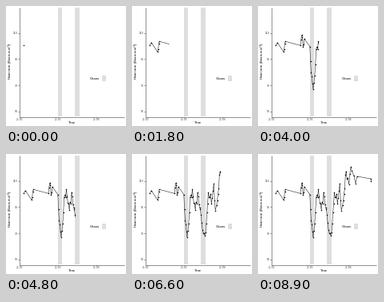
A matplotlib script that plays this animation: 150x150 px, repeating every 10 s.

```python
import numpy as np
import matplotlib.pyplot as plt
from matplotlib.animation import FuncAnimation
from matplotlib.patches import Rectangle

SIZE, DPI = 150, 100
PX = 72 / DPI  # points per pixel
FRAMES, STEP_MS, LAST_STEP = 100, 100, 89

plt.rcParams.update({
    "font.family": "Liberation Sans",
    "mathtext.fontset": "custom",
    "mathtext.rm": "Liberation Sans",
})

# Bursts of evenly spaced readings: first x, last x, heights (stage pixels)
BURSTS = [
    (22.3, 24.2, [49, 45.7]),
    (31.9, 34.3, [57.3, 54, 46.5, 44.3]),
    (53, 57.9, [49.3, 42, 36.3, 38.5, 51, 48, 41]),
    (64.8, 68.9, [50.5, 69, 83, 87.5, 97, 104]),
    (69.9, 81, [96, 87, 73, 54, 51, 54, 44, 53, 61, 62, 70, 60, 62]),
    (82, 87.1, [48, 53, 63, 67, 69, 76, 86]),
    (88.2, 91.2, [95, 99, 99, 102]),
    (92, 95.4, [98, 87, 73, 62, 48]),
    (96.3, 104.2, [54, 54, 50, 62, 55, 46, 37, 58, 70.5]),
    (105.7, 110.2, [64, 58, 50, 43, 26, 21.5]),
    (111.2, 117.3, [31, 30, 38, 25, 16, 21]),
    (119.8, 124, [27, 36.5, 28]),
    (141, 141.3, [31, 34.3]),
]
X = np.concatenate([np.linspace(a, b, len(ys)) for a, b, ys in BURSTS])
Y = np.concatenate([ys for _, _, ys in BURSTS])

fig = plt.figure(figsize=(SIZE / DPI, SIZE / DPI), dpi=DPI, facecolor="white")
ax = fig.add_axes([0, 0, 1, 1])
ax.set(xlim=(0, SIZE), ylim=(SIZE, 0))
ax.axis("off")


def rule(xs, ys, color="#4d4d4d"):
    ax.plot(xs, ys, color=color, lw=0.6 * PX, solid_capstyle="butt")


def label(x, y, text, size, color="black", **kw):
    ax.text(x, y, text, fontsize=size * PX, color=color,
            **{"ha": "center", "va": "center", **kw})


def block(x, y, w, h):
    ax.add_patch(Rectangle((x, y), w, h, fc="#dedede", ec="none"))


block(65, 2, 5, 136)
block(86, 2, 6, 136)
block(120, 87, 4.5, 7)
label(117.3, 91, "Chaos", 4.2, ha="right")

rule([16.5, 16.5], [2, 138.5])
rule([16.5, 147.5], [138.5, 138.5])
for i, text in enumerate(("110", "90", "70", "50")):
    y = 33.5 + 32.8 * i
    rule([15.3, 16.5], [y, y])
    label(14.8, y, text, 3.5, "#4d4d4d", ha="right", va="center_baseline")
for i, text in enumerate(("21:02", "21:05", "21:08")):
    x = 17 + 48 * i
    rule([x, x], [138.5, 139.7])
    label(x, 141.7, text, 3.4, "#4d4d4d")

label(82, 146.3, "Time", 4.2)
label(5.6, 68.5, r"Heart rate (Beats min$^{-1}$)", 4.3, rotation=90)

line, = ax.plot([], [], color="#222222", lw=0.55 * PX, solid_joinstyle="round")
dots, = ax.plot([], [], "o", color="black", ms=1.5 * PX, mew=0)


def draw(frame):
    """Reveal the trace at constant speed, then hold."""
    part = min(frame / LAST_STEP, 1)
    tip = X[0] + (X[-1] - X[0]) * part
    n = len(X) if part == 1 else np.searchsorted(X, tip, side="right")
    line.set_data(np.append(X[:n], tip), np.append(Y[:n], np.interp(tip, X, Y)))
    dots.set_data(X[:n], Y[:n])
    return line, dots


anim = FuncAnimation(fig, draw, frames=FRAMES, interval=STEP_MS,
                     init_func=lambda: draw(0), repeat=True, repeat_delay=0)
plt.show()
```
